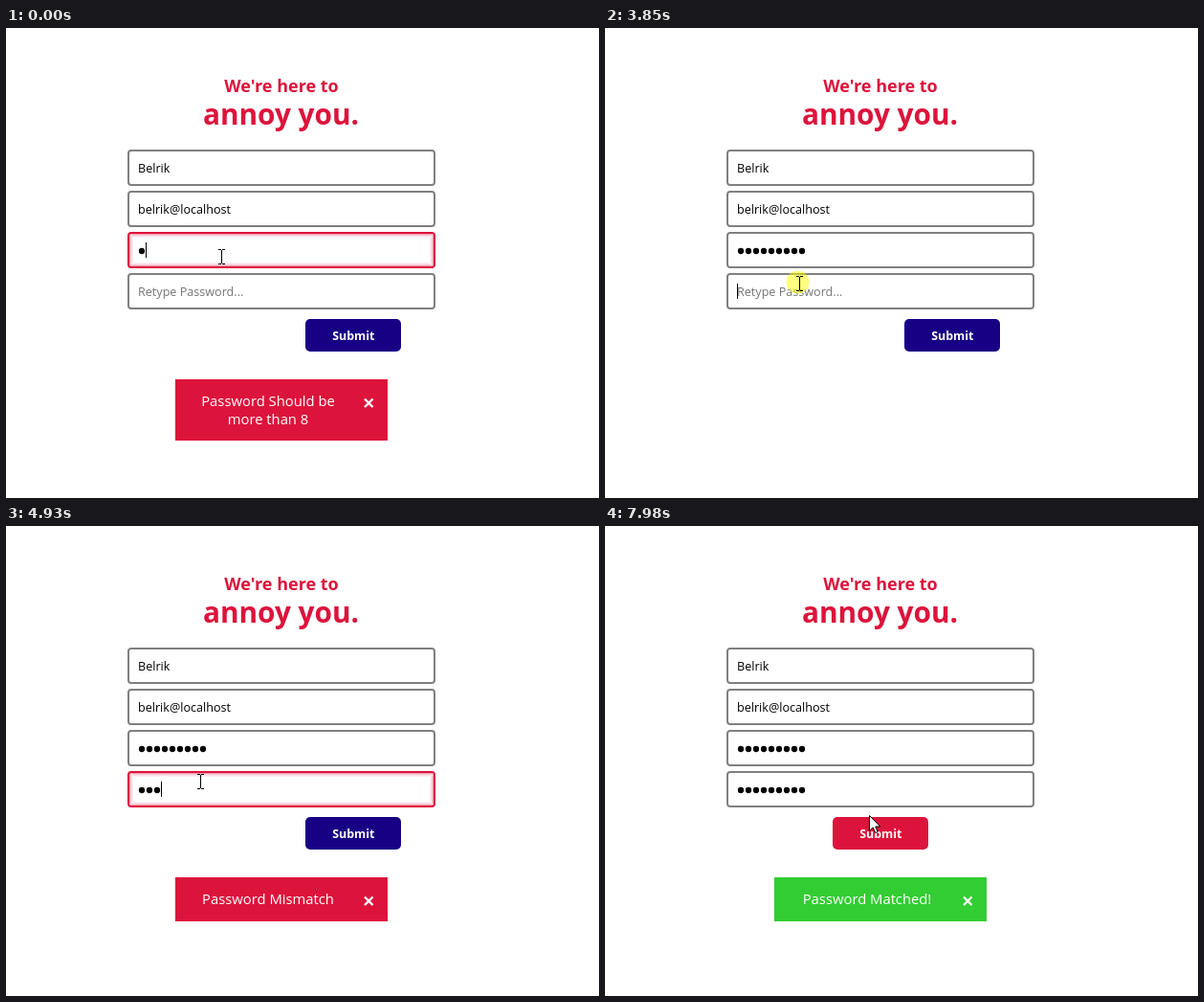
Write an HTML page that moves like this. It is 620 px wide and 491 px high and loops after 8000 ms.

```html
<!DOCTYPE html>
<html lang="en">
<head>
<meta charset="utf-8">
<title>Sign-up form</title>
<style>
  html, body { margin: 0; width: 100%; height: 100%; overflow: hidden; background: #fff; }
  svg { display: block; width: 100vw; height: 100vh; }
  text { font-family: "Open Sans", "Noto Sans", sans-serif; }
  .head { font-weight: 700; fill: #dc143c; text-anchor: middle; }
  .input { font-size: 12.6px; }
  .btn { font-size: 12.4px; font-weight: 700; fill: #fff; text-anchor: middle; }
  .note { font-size: 14.8px; font-weight: 500; fill: #fff; text-anchor: middle; }
</style>
</head>
<body>
<svg id="stage" viewBox="0 0 620 491"></svg>
<script>
const LOOP = 8000, TICK = 66, BLINK = 530, LENGTH = 9;
const RED = '#dc143c', GREEN = '#32cd32', NAVY = '#180085', GRAY = '#808080';
const FOCUS = 3850, RETYPE = 4340;
const rowY = i => 127 + 43 * i;
const stage = document.getElementById('stage');

function set(node, attrs) {
  for (const key in attrs) node.setAttribute(key, attrs[key]);
}
function add(tag, attrs, parent = stage, text = '') {
  const node = document.createElementNS('http://www.w3.org/2000/svg', tag);
  set(node, attrs);
  node.textContent = text;
  parent.appendChild(node);
  return node;
}
const show = (node, on) => set(node, { visibility: on ? 'visible' : 'hidden' });
const write = (x, y, cls, text, attrs = {}, parent = stage) =>
  add('text', { x, y, class: cls, ...attrs }, parent, text);

write(288, 67, 'head', "We're here to", { 'font-size': 18 });
write(287.5, 101, 'head', 'annoy you.', { 'font-size': 29.8 });

// Form fields, each with a soft inner glow for the error state
const fields = Array.from({ length: 4 }, (_, i) => {
  const y = rowY(i);
  const glow = add('g', { fill: 'none', stroke: RED });
  for (let k = 0; k < 4; k++) {
    add('rect', {
      x: 129.5 + k, y: y + 2.5 + k, width: 317 - 2 * k, height: 33 - 2 * k,
      rx: 2, 'stroke-opacity': 0.4 * 0.55 ** k
    }, glow);
  }
  const box = add('rect', {
    x: 128, y: y + 1, width: 320, height: 36, rx: 3, fill: 'none', 'stroke-width': 2
  });
  return { box, glow };
});
write(138, 151, 'input', 'Belrik');
write(138, 194, 'input', 'belrik@localhost');
const hint = write(138, 280, 'input', 'Retype Password...', { fill: '#757575' });

const dots = [2, 3].map(row => Array.from({ length: LENGTH }, (_, i) =>
  add('circle', { cx: 142 + 8 * i, cy: rowY(row) + 20, r: 3.15 })));
const caret = add('rect', { width: 1, height: 16 });

const button = add('g', {});
const face = add('rect', { y: 304, width: 100, height: 34, rx: 5 }, button);
write(50.3, 326, 'btn', 'Submit', {}, button);

const toast = add('g', {});
const panel = add('rect', { x: 177, y: 367, width: 222 }, toast);
const lines = [395, 414].map(y => write(274, y, 'note', '', {}, toast));
add('path', { d: 'M375 387.5l8.5 8.5m0-8.5l-8.5 8.5', stroke: '#fff', 'stroke-width': 2.4 }, toast);

const halo = add('circle', { cx: 201.5, cy: 265.5, r: 12, fill: '#ff0', 'fill-opacity': 0.5 });
const beam = add('path', {
  d: 'M-3-7.5h3m1 0h3M.5-7V7M-3 7.5h3m1 0h3', fill: 'none', stroke: '#000', 'shape-rendering': 'crispEdges'
});
const arrow = add('path', {
  d: 'M.5.5V16.5L4.2 13L6.7 18.6L9.2 17.5L6.8 12H11.8Z', fill: '#fff', stroke: '#000'
});

const NOTES = {
  short: { text: ['Password Should be', 'more than 8'], fill: RED },
  mismatch: { text: ['Password Mismatch', ''], fill: RED },
  match: { text: ['Password Matched!', ''], fill: GREEN }
};

// Steady typing that slows down over the last few characters
const keyDelay = i => 200 * i + 25 * Math.max(0, i - 5) ** 2;
const DONE = keyDelay(LENGTH - 1);

function typed(t) {
  let n = 0;
  while (n < LENGTH && t >= keyDelay(n)) n++;
  return n;
}

function noteAt(t) {
  if (t < DONE + 45) return 'short';
  if (t < RETYPE + 120) return '';
  return t < RETYPE + DONE + 155 ? 'mismatch' : 'match';
}

// Eased progress of a pointer move, advancing once per tick
function glide(t, start, steps) {
  const k = Math.floor((t - start) / TICK) + 1;
  const p = Math.min(1, Math.max(0, k / steps));
  return p * (2 - p);
}

function pointerAt(t) {
  const a = glide(t, 2470, 5), b = glide(t, 7440, 4), c = glide(t, 7710, 4);
  return [225 - 22 * a + 78 * b - 5 * c, 239 + 28 * a + 56 * b - 21 * c].map(Math.round);
}

function render(t) {
  const counts = [typed(t), typed(t - RETYPE)];
  dots.forEach((row, r) => row.forEach((dot, i) => show(dot, i < counts[r])));
  show(hint, !counts[1]);

  const active = t < FOCUS ? 0 : 1;
  const idle = t - (active ? FOCUS : 2000);
  set(caret, { x: 138 + 8 * counts[active], y: rowY(active + 2) + 11 });
  show(caret, idle < 0 || Math.floor(idle / BLINK) % 2 === 0);

  const note = noteAt(t);
  const bad = { short: 2, mismatch: 3 }[note];
  fields.forEach(({ box, glow }, i) => {
    set(box, { stroke: i === bad ? RED : GRAY });
    show(glow, i === bad);
  });

  show(toast, note);
  if (note) {
    const { text, fill } = NOTES[note];
    set(panel, { height: text[1] ? 64 : 46, fill });
    lines.forEach((line, i) => { line.textContent = text[i]; });
  }
  const matched = note === 'match';
  set(button, { transform: `translate(${matched ? 238 : 313})` });
  set(face, { fill: matched ? RED : NAVY });

  const [x, y] = pointerAt(t);
  const onField = y < rowY(3) + 38;
  set(onField ? beam : arrow, { transform: `translate(${x} ${y})` });
  show(beam, onField);
  show(arrow, !onField);
  show(halo, t >= FOCUS && t < FOCUS + 70);
}

const start = performance.now();
function tick() {
  render((performance.now() - start) % LOOP);
  requestAnimationFrame(tick);
}
tick();
</script>
</body>
</html>
```
